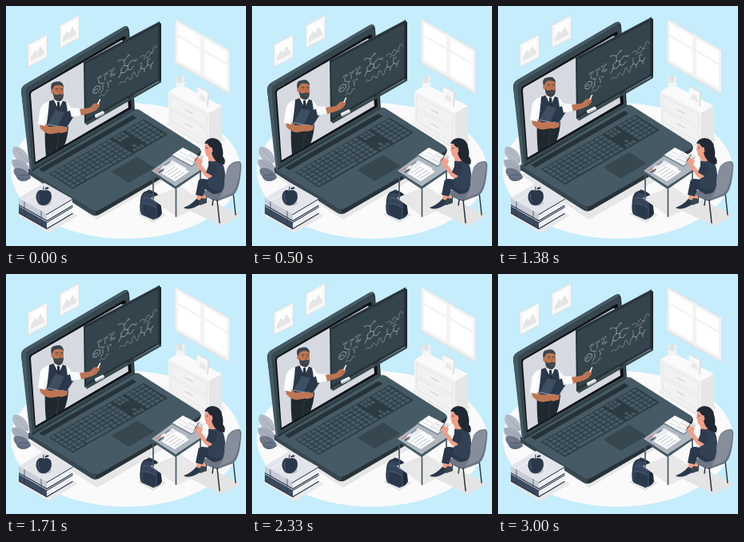
An HTML page with a canvas that plays this animation: 300 by 300 pixels, repeating every 3.04 s.

```html
<!DOCTYPE html>
<html lang="en">
<head>
<meta charset="utf-8">
<title>Online lesson</title>
<style>
html, body { margin: 0; width: 100%; height: 100%; overflow: hidden; background: #c6edfb; }
canvas { display: block; width: 300px; height: 300px; }
</style>
</head>
<body>
<canvas id="stage"></canvas>
<script>
const LOOP = 3040, FPS = 24, STEPS = 72, RISE = 6;
const INK = '#263238', SLATE = '#37474f', STEEL = '#455a64', NAVY = '#2a384b';
const SKIN = '#bd7654', PINK = '#f0a08a', GREY = '#868e9c';
const cv = document.getElementById('stage');
const g = cv.getContext('2d');
const dpr = Math.max(1, window.devicePixelRatio || 1);
cv.width = cv.height = 300 * dpr;

const fill = (c, d) => { g.fillStyle = c; g.fill(new Path2D(d)); };
const line = (c, w, d) => {
  g.strokeStyle = c; g.lineWidth = w; g.lineCap = g.lineJoin = 'round';
  g.stroke(new Path2D(d));
};
const oval = (c, x, y, rx, ry = rx, a = 0) => {
  g.fillStyle = c; g.beginPath(); g.ellipse(x, y, rx, ry, a, 0, 7); g.fill();
};

function wallPicture(x, y) {
  g.save();
  g.transform(1, -.52, 0, 1, x, y);
  fill('#e0e0e0', 'M0 0H25V29H0Z');
  fill('#f7f7f7', 'M1 1H24V28H1Z');
  fill('#fff', 'M4 4H21V23H4Z');
  fill('#e6e6e6', 'M4 23V18L9 12L12 16L16 10L21 20V23Z');
  g.restore();
}

function room() {
  g.fillStyle = '#c6edfb';
  g.fillRect(0, 0, 300, 300);
  oval('#fafafa', 150, 206, 144, 85);
  wallPicture(27, 48);
  wallPicture(67, 24);

  // window
  g.save();
  g.transform(1, .575, 0, 1, 211, 15.5);
  fill('#e3e3e3', 'M0 0H69V56H0Z');
  fill('#f3f3f3', 'M1 1H68V54H1Z');
  for (const x of [4, 37]) fill('#fff', `M${x} 4h28v14h-28Z M${x} 21h28v29h-28Z`);
  g.restore();

  // cabinet
  fill('#ebebeb', 'M200 147L218 138L274 167L253 180Z');
  fill('#fafafa', 'M203 107L218 98L270 125L254 134Z');
  fill('#f2f2f2', 'M203 107L254 134V176L203 147Z');
  fill('#e6e6e6', 'M254 134L270 125V167L254 176Z');
  line('#dedede', .7, 'M206 112L251 136V151L206 127Z M206 130L251 155V170L206 144Z');
  line('#d0d0d0', 1.2, 'M224 129.5L233 134.5 M224 147L233 152');

  // pot and photo stand
  oval('#e7e7e7', 215, 93, 3, 4, -.4);
  oval('#efefef', 220, 92, 3, 4, .4);
  oval('#dfdfdf', 218, 91, 2, 4);
  fill('#f5f5f5', 'M212 95Q218 98 224 95L222 102Q218 104 214 102Z');
  fill('#dedede', 'M239 101L241 100L254 108L253 125L251 126Z');
  fill('#f8f8f8', 'M239 101L252 108L251 126L238 118Z');
  fill('#e9e9e9', 'M241 116L244 109L246 113L248 111L250 121Z');
}

function leaf(x, y, len, a, c) {
  g.save();
  g.translate(x, y);
  g.rotate(a);
  fill(c, `M0 0C${len * .2} ${-len * .4} ${len * .9} ${-len * .4} ${len} 0C${len * .8} ${len * .3} ${len * .2} ${len * .3} 0 0Z`);
  line('#8a94a5', .5, `M0 0H${len * .85}`);
  g.restore();
}

function plant() {
  leaf(28, 196, 27, -2.3, '#b3bac6');
  leaf(30, 206, 26, -2.6, '#a5adbb');
  leaf(31, 215, 24, -2.65, '#6b7689');
  leaf(31, 214, 18, -3.1, '#5e6a7e');
}

// point on the keyboard deck: a runs along the hinge, b towards the user
const deck = (a, b) => `${31 + 130 * a + 82 * b} ${204 - 75 * a + 52 * b}`;
const quad = (a, b, w, h) =>
  `M${deck(a, b)}L${deck(a + w, b)}L${deck(a + w, b + h)}L${deck(a, b + h)}Z`;

function keys(a, w, cols, row, rows) {
  const kw = w / cols, kh = .058;
  for (let r = row; r < row + rows; r++) {
    for (let c = 0; c < cols; c++) {
      fill(STEEL, quad(a + c * kw, .2 + r * kh, kw - .009, kh - .013));
    }
  }
}

function base() {
  fill(INK, 'M28 204V210L106 260Q112 264 118 260L240 189Q244 186 244 181Z');
  fill(STEEL, 'M31 203L159 130Q163 128 167 130L241 177Q246 181 241 184L118 254Q112 258 106 254L30 207Q28 205 31 203Z');
  fill(SLATE, 'M28 205L30 207L106 254Q109 256 112 256V262Q109 262 106 260L28 210Z');
  fill(INK, quad(.04, .06, .9, .065));
  fill('#2c3a42', quad(.055, .19, .91, .365));
  keys(.065, .58, 13, 0, 5);
  keys(.065, .13, 3, 5, 1);
  fill(STEEL, quad(.2, .49, .25, .045));
  keys(.462, .183, 4, 5, 1);
  keys(.665, .1, 3, 0, 2);
  keys(.698, .033, 1, 4, 1);
  keys(.665, .1, 3, 5, 1);
  keys(.785, .175, 4, 0, 6);
  fill(SLATE, quad(.385, .615, .25, .265));
}

function screen() {
  fill(INK, 'M19 107Q19 101 24 98L147 26Q153 23 154 31L161 130L32 207Z');
  fill(STEEL, 'M19 107Q19 101 24 98L147 26Q151 24 153 27L28 101Q24 103 25 109L33 204L30 207Z');
  fill(SLATE, 'M25 109Q24 103 28 101L149 30Q153 28 153 33L160 130L33 204Z');
  fill('#0d1114', 'M29 110Q29 107 31 106L147 38Q150 37 150 41L157 128L36 198Z');
  fill('#d6d9e0', 'M31 111Q31 108 33 107L144 43Q146 42 146 45L153 127L37 195Z');
}

function chalk(s, x, y, size = 3.7) {
  g.font = `${size}px "Open Sans", sans-serif`;
  g.fillText(s, x, y);
}

function hexagon(x, y, r) {
  let d = '';
  for (let i = 0; i < 6; i++) {
    const a = i * Math.PI / 3 + Math.PI / 6;
    d += `${i ? 'L' : 'M'}${x + r * Math.cos(a)} ${y + r * Math.sin(a)}`;
  }
  line('#d9e1e5', .5, d + 'Z');
}

function board() {
  fill('#1d2733', 'M190 19.5L194 22V94L191 95Z');
  fill(INK, 'M97 70L192 19.5V93L98 147Z');
  fill('#34444c', 'M99 72.5L190 24V91L100 142Z');
  line('#4b5d68', .6, 'M97 70L192 19.5');
  fill(SLATE, 'M99 146L194 92.5V95.5L101 149Z');
  g.save();
  g.transform(1, -.53, 0, 1, 97, 70);
  g.fillStyle = '#dfe6e9';
  chalk('HO', 17, 31);
  chalk('HO', 25, 31);
  chalk('H O', 32, 30);
  chalk('H', 23, 41);
  chalk('C H', 29, 43);
  chalk('OH', 34, 37);
  chalk('OH', 13, 44, 3.2);
  line('#d9e1e5', .45, 'M19 32V36L23 39 M27 32V37 M36 31L33 35 M24 42V47L21 50 M31 44V48');
  hexagon(16, 43, 4.6);
  hexagon(51, 36, 4.6);
  line('#d9e1e5', .45, 'M51 31.4V25L47 22 M51 25L55 22 M55 38.3L59 41L63 38 M55 33.7L60 30L64 32 M47 38.3L44 43');
  chalk('N', 55, 23);
  chalk('O', 64, 34);
  chalk('H', 43, 23);
  line('#aab8bf', .45, 'M45 51Q47 48 49 51T53 50T57 51T61 49T65 50T69 50 M71 32Q73 29 75 32T79 31T83 32T87 30T92 31 M75 36Q77 34 79 36T83 35T87 35 M20 54Q22 51 24 54T28 53T32 53');
  line('#d9e1e5', .45, 'M69 49L72 46L76 49L80 46L84 49L87 46 M72 46V42 M76 49V53 M80 46V42 M84 49V53');
  chalk('H', 71, 41, 3);
  chalk('OH', 79, 41, 3);
  g.restore();
  fill('#f5f6f7', 'M111 136L121 131L123 133V135L113 140L111 138Z');
  fill('#aebac0', 'M113 138L123 133V135L113 140Z');
}

function teacher() {
  // trousers
  fill('#1f292f', 'M49 150L78 147Q78 162 73 174.5L50 188Q48 168 49 150Z');
  line('#3b4a52', .6, 'M63 180L66 160');
  // shirt and waistcoat
  fill('#f8f9fa', 'M49 121Q57 117 62 117L72 118Q79 121 82 128L95 129L96 136L81 139L76 135L76 151L49 154Q48 137 46 126Z');
  fill(NAVY, 'M54 119L60 117L66 129L70 118L75 120Q78 134 78 154L49 158Q53 136 54 119Z');
  fill('#fff', 'M59 116L66 130L71 118L69 115Z');
  fill(INK, 'M64 120H67L68 130L66 133L64 129Z');
  fill(SKIN, 'M59 110H70V116Q66 121 60 117Z');
  // head
  fill('#3a444c', 'M57 106Q54 96 61 95Q70 92 72 100L70 108L60 113Z');
  fill(SKIN, 'M58 104Q60 98 66 99Q72 98 72 105Q73 115 67 117Q60 118 58 108Z');
  fill('#3a444c', 'M59 108L61 111L65 111Q68 109 70 111L72 109.5Q72 119 66 119.5Q59 118 59 108Z');
  oval(SKIN, 58, 107, 1.8, 2.4);
  line('#8f543f', .8, 'M66 113H69');
  line(INK, .8, 'M62 104L65 103.5 M68 103.5L71 104');
  oval(INK, 64, 106, .6); oval(INK, 69.5, 106, .6);
  line('#985b43', .7, 'M67 105.5L68 108.5H66.5');
  // book and near arm
  fill(SKIN, 'M42 146L47 145L54 151L70 150L77 153L75 157L56 160Q49 160 43 153Z');
  fill(NAVY, 'M62 130L73 133L85 129L89 132L76 152L52 148Z');
  fill('#3d4f60', 'M62 130L73 133L65 150L52 148Z');
  line('#c6d0d4', .7, 'M52 148L65 150.5L76 152L89 132');
  fill('#fff', 'M50 121Q43 123 42 133L40 148L49 150L51 138Z');
  line('#d5dade', .6, 'M50 135L48 149');
  fill(SKIN, 'M64 151L71 150L77 153L76 157L69 159L64 157Z');
}

function pointingArm() {
  fill('#f8f9fa', 'M79 127L92 128L94 136L82 139Z');
  fill(SKIN, 'M92 129L105 127L110 122L117 121L117 125L113 130L107 133L94 137Z');
  line('#945640', .6, 'M112 125L116 124 M111 128L114 127');
  line('#fff', 1.5, 'M115 122L117.5 117');
}

function book(y, spine) {
  fill('#f6f7f9', `M51 ${y + 20}L83 ${y + 1}V${y + 10}L51 ${y + 29}Z`);
  fill(spine, `M16 ${y}L51 ${y + 20}V${y + 29}L16 ${y + 9}Z`);
  line('#c3c8d2', .5, `M52 ${y + 24}L82 ${y + 6}`);
  line(NAVY, 1.4, `M16.5 ${y + 9}L51 ${y + 28.5}L83 ${y + 9.5} M51 ${y + 20.5}L83 ${y + 1.5}`);
  line(NAVY, .7, `M23 ${y + 4}V${y + 13} M44 ${y + 16}V${y + 25}`);
  fill('#e3e5eb', `M16 ${y}L48 ${y - 19}L83 ${y + 1}L51 ${y + 20}Z`);
}

function books() {
  fill('#e8e8e8', 'M13 260L48 240L90 262L53 284Z');
  book(250, '#3c4a5f');
  book(240, '#c7ccd6');
  line('#f7f8fa', .8, 'M23 243.5L55 225');
  oval('#bfc4cf', 48, 246, 9, 4);
  fill(NAVY, 'M47 231Q52 228 56 233Q59 241 53 247Q48 251 42 248Q36 243 38 235Q41 228 47 231Z');
  line('#526178', 1.1, 'M41 235Q39.5 240 42 244');
  line(INK, 1, 'M47 231Q46 228 47 226');
  fill(NAVY, 'M48 229Q50 225 54 227Q52 230 48 229Z');
}

function backpack() {
  fill('#e4e4e4', 'M164 260L180 252L200 261L184 271Z');
  line(NAVY, 1.3, 'M176 233Q178 228 183 232');
  fill('#202c3c', 'M168 243Q169 231 178 231Q191 231 193 243L195 259Q194 264 184 267L170 261Q166 258 168 243Z');
  fill('#34445a', 'M169 242Q170 233 177 233Q187 234 189 245L189 265L184 267L170 260Q167 256 169 242Z');
  fill(NAVY, 'M171 247Q178 246 187 252V264Q183 267 172 260Z');
  line('#66748a', .6, 'M171 247Q178 246 187 252 M172 240Q180 238 187 246');
}

function desk() {
  fill('#e8e8e8', 'M181 240L214 264L250 246L217 225Z');
  line(STEEL, 1.7, 'M184 211V241 M212.5 229V263 M243 206V240 M216 207V225');
  fill(STEEL, 'M182 206L212 225L247 202V205L212 229L182 209Z');
  fill('#aeb6c0', 'M182 206L216 181L247 202L212 225Z');
  // open book
  fill('#6f7d8c', 'M206 187L221 177L246 190L232 201Z');
  fill('#fff', 'M208 186L221 177L233 183L220 193Z');
  fill('#f3f4f6', 'M220 193L233 183L245 190L232 199.5Z');
  line('#9fa8b5', .5, 'M213 185L222 189.5 M217 182L226 186.5 M225 191L234 195.5 M230 187L239 191.5');
  // loose sheets
  fill('#eceef1', 'M192 203L208 193L226 203L211 214Z');
  fill('#fff', 'M194 209L213 197L229 207L211 219Z');
  line('#83909f', .6, 'M199 209L211 201 M203 211L215 203 M206 214L219 205.5 M210 216L223 207.5');
  line('#d9786c', 1.2, 'M187 206L194 202');
  line(NAVY, 1.2, 'M191 208L197 204');
  line('#66748a', 1.2, 'M199 199L205 195');
}

function student() {
  fill('#e4e4e4', 'M222 252L248 239L294 262L270 275Z');
  line(INK, 1.4, 'M284 233L287 261 M252 234L249 246');
  // legs and shoes
  fill(PINK, 'M239 230L247 231L244 243L238 243Z M246 232L252 232L249 243L244 242Z');
  fill(NAVY, 'M238 241Q242 244 245 242L245 247L235 252Q226 255 222 252Q231 249 238 241Z');
  fill(SLATE, 'M244 240L251 241V246L243 249Q240 246 244 240Z');
  // seat
  fill('#6c7584', 'M244 232L267 226L283 235L264 244Q252 242 244 232Z');
  fill(NAVY, 'M263 218L246 216Q240 216 240 221L237 236L246 238L249 229L259 235Q273 235 274 222Z');
  // torso
  fill('#334155', 'M253 194Q260 189 267 192Q273 198 274 210L273 228Q266 235 252 225L253 208Z');
  // head and hair
  fill(PINK, 'M252 187L262 186L263 193Q257 196 253 192Z');
  fill(PINK, 'M249 173Q252 168 258 170L263 177L260 188Q254 191 250 187L249 182L248 180Z');
  line(INK, .8, 'M250.5 177.5H252');
  fill('#1f2833', 'M248 172Q250 166 258 165Q269 166 270 176Q272 183 271 188Q275 192 273 198Q266 198 262 193Q258 189 257 183L258 177Q254 177 252 172Z');
  oval(PINK, 257, 181, 1.4, 2);
  // writing arm
  fill(PINK, 'M252 208L258 212Q255 218 249 213L239 200L237 194L241 192L244 198Z');
  fill('#2d3a4d', 'M254 197Q261 194 263 200Q263 208 259 213L250 208Z');
  fill(PINK, 'M235 192L240 189L246 193L244 199L238 197Z');
  line(INK, .8, 'M235 196L241 186');
  // chair back and near legs
  fill('#6c7584', 'M278 200Q284 193 292 194Q295 196 294 204Q292 232 283 237L264 244Q259 243 260 239Q271 235 273 224Q274 209 278 200Z');
  fill(GREY, 'M277 202Q282 195 291 195Q294 198 292 207Q289 230 281 235Q273 238 266 240Q272 234 273 224Q274 211 277 202Z');
  line(INK, 1.5, 'M264 243L267 271 M259 242L258 249');
}

// even rise and fall at 24 steps a second, with a short rest at the bottom
function liftAt(ms) {
  const step = Math.floor((ms % LOOP + 5) * FPS / 1000);
  return RISE * (1 - Math.abs(1 - 2 * Math.min(step, STEPS) / STEPS));
}

function draw(ms) {
  g.setTransform(dpr, 0, 0, dpr, 0, 0);
  room();
  fill('#e6e6e6', 'M28 211L160 136L249 188L114 267Z');
  plant();
  g.save();
  g.translate(0, -liftAt(ms));
  base();
  screen();
  teacher();
  board();
  pointingArm();
  g.restore();
  books();
  backpack();
  desk();
  student();
}

let start;
function tick(now) {
  if (start === undefined) start = now;
  draw(Math.max(0, now - start));
  requestAnimationFrame(tick);
}
draw(0);
requestAnimationFrame(tick);
</script>
</body>
</html>
```
